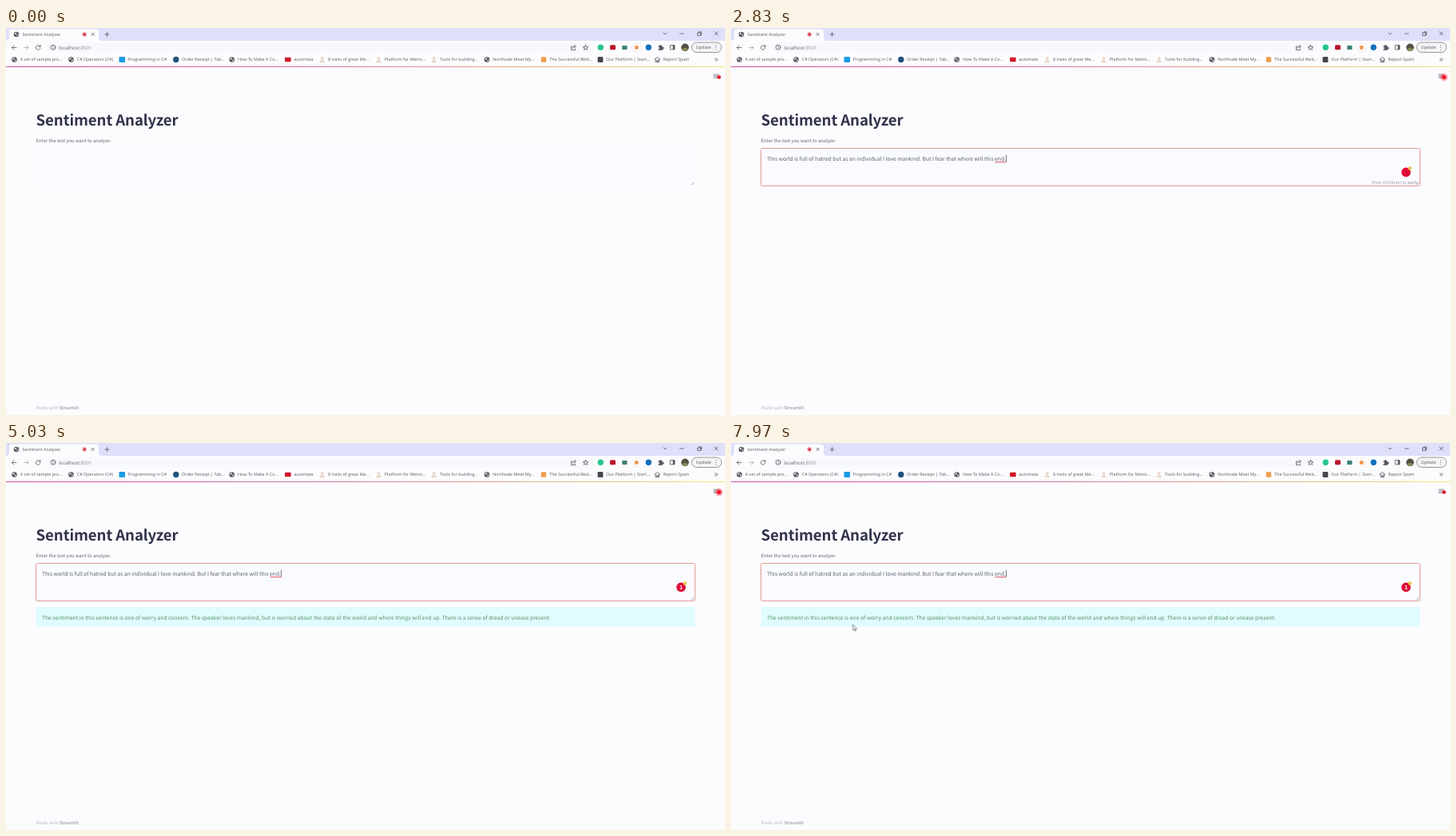
Animation, 900 px wide and 484 px high, one loop 8000 ms. Source, as an HTML page:

```html
<!DOCTYPE html>
<html lang="en">
<head>
<meta charset="utf-8">
<title>Sentiment Analyzer</title>
<style>
html, body { margin: 0; width: 100%; height: 100%; overflow: hidden; background: #fcfcff; }
svg { display: block; width: 100%; height: 100%; }
text { text-rendering: geometricPrecision; white-space: pre; }
.chrome { font: 5.4px "Open Sans", "Noto Sans", sans-serif; fill: #5b5b60; }
.page { font: 6.73px "Noto Sans CJK SC", "Noto Sans CJK JP", "Noto Sans CJK", "Noto Sans", sans-serif; }
.line { fill: none; stroke: #55555c; stroke-width: .8; stroke-linecap: round; stroke-linejoin: round; }

/* Timeline: one 8 s loop, hard cuts unless stated otherwise */
.cut { animation: 8s step-end infinite; }
.focus { animation-name: focus; }
.typed { animation-name: typed; }
.hint { animation-name: hint; }
.caret { animation-name: caret; }
.idle { animation-name: idle; }
.flagged { animation-name: flagged; }
.count { animation-name: count; }
.running { animation-name: running; }
.answer { animation: answer 8s linear infinite; }
.panel { animation: panel 8s linear infinite; }
.glow { animation: glow 1s ease-in-out infinite alternate; }
.mouse { animation: move 8s ease-in-out infinite, mouse 8s step-end infinite; }

@keyframes focus { 0% { opacity: 0 } 10%, 100% { opacity: 1 } }
@keyframes typed { 0% { opacity: 0 } 18.875%, 100% { opacity: 1 } }
@keyframes hint { 0% { opacity: 0 } 18.875% { opacity: 1 } 42.5%, 100% { opacity: 0 } }
@keyframes idle { 0% { opacity: 0 } 12.5% { opacity: 1 } 30%, 100% { opacity: 0 } }
@keyframes flagged { 0% { opacity: 0 } 30%, 100% { opacity: 1 } }
@keyframes count { 0% { opacity: 0 } 37.5%, 100% { opacity: 1 } }
@keyframes running { 0% { opacity: 0 } 45.5% { opacity: 1 } 57%, 100% { opacity: 0 } }
@keyframes caret {
  0%, 25.5%, 38.75%, 52%, 65.25%, 78.5%, 91.75% { opacity: 0 }
  18.875%, 32.125%, 45.375%, 58.625%, 71.875%, 85.125%, 98.375%, 100% { opacity: 1 }
}
@keyframes answer {
  0%, 52.4% { opacity: 0; fill: #8fc3d0 }
  53.75% { opacity: .7; fill: #8fc3d0 }
  57%, 100% { opacity: 1; fill: #5c9068 }
}
@keyframes panel { 0%, 53.8% { opacity: 0 } 57%, 100% { opacity: 1 } }
@keyframes glow { from { opacity: 0 } to { opacity: 1 } }
@keyframes mouse { 0% { opacity: 0 } 76.25%, 100% { opacity: 1 } }
@keyframes move {
  0%, 76.25% { transform: translate(300px, 300px) }
  83.75% { transform: translate(222.5px, 256.5px) }
  94%, 100% { transform: translate(152.5px, 227px) }
}
</style>
</head>
<body>
<svg viewBox="0 0 900 484" preserveAspectRatio="none">
  <defs>
    <linearGradient id="accent">
      <stop offset="0" stop-color="#cf4fa9"/>
      <stop offset=".45" stop-color="#d673a0"/>
      <stop offset=".75" stop-color="#e3b384"/>
      <stop offset="1" stop-color="#ebe67c"/>
    </linearGradient>
    <radialGradient id="halo">
      <stop offset=".35" stop-color="#ff2a3c" stop-opacity=".75"/>
      <stop offset="1" stop-color="#ff2a3c" stop-opacity="0"/>
    </radialGradient>
    <g id="globe">
      <circle r="3.3" fill="#55565a"/>
      <path d="M-2.2-1.2Q-.6-2.8.6-1.8L-.4-.3-2.2.2ZM.4.7 2.5-.4Q2.4 1.6.8 2.4Z" fill="#e4e5ea"/>
    </g>
    <g id="figure" fill="none" stroke="#e6bc9c" stroke-width=".9">
      <circle cy="-1.6" r="1.3"/>
      <path d="M-2.8 2.8Q0-1.2 2.8 2.8Z"/>
    </g>
  </defs>

  <rect width="900" height="484" fill="#fcfcff"/>

  <g class="chrome">
    <rect width="900" height="16" fill="#dedffa"/>
    <path d="M0 16Q4 16 4 12V5Q4 1.5 7.5 1.5H113Q116 1.5 116 5V12Q116 16 120 16Z" fill="#fcfcff"/>
    <use href="#globe" x="13" y="8"/>
    <text x="20.5" y="10" font-size="5.3">Sentiment Analyzer</text>
    <circle cx="98.2" cy="8" r="2.6" fill="none" stroke="#e98a90" stroke-width=".8"/>
    <circle cx="98.2" cy="8" r="1.7" fill="#d9182d"/>
    <path class="line" d="M107 6.3l3.2 3.2m0-3.2l-3.2 3.2M124 8h5m-2.5-2.5v5"/>
    <path class="line" d="M823 6l2 2 2-2M843.5 7h4.5M866 6h3.5v3.5h-3.5ZM867.2 6v-1.2h3.5v3.5h-1.2M887 4.7l4.2 4.2m0-4.2l-4.2 4.2"/>

    <rect x="51" y="18.5" width="685" height="12" rx="6" fill="#f8f8ff"/>
    <path class="line" d="M13 24.5H7.4m2.5-2.6-2.6 2.6 2.6 2.6"/>
    <path class="line" stroke-opacity=".5" d="M22.5 24.5h5.4m-2.5-2.6 2.6 2.6-2.6 2.6"/>
    <path class="line" d="M42.5 22.7A2.8 2.8 0 1 0 43 25M43.1 21.4v2h-2"/>
    <circle class="line" cx="59" cy="24.2" r="3"/>
    <path class="line" d="M59 24v1.6M59 22.5v.1"/>
    <text x="66.3" y="26.5" font-size="6.1">localhost<tspan fill="#8a8a92">:8501</tspan></text>

    <path class="line" d="M709.5 23h-2v4.5h5v-1.5M709 25.5q.5-2.6 3.5-2.6M711.5 21.2l2 1.7-2 1.7"/>
    <path class="line" d="M725.5 21.3l.9 2.1 2.3.2-1.8 1.4.6 2.3-2-1.2-2 1.2.6-2.3-1.8-1.4 2.3-.2Z"/>
    <circle cx="744.3" cy="24.2" r="3.7" fill="#27c58f"/>
    <rect x="756" y="21.2" width="7" height="6" rx="1.5" fill="#b9162d"/>
    <rect x="771.3" y="22" width="6.2" height="5" fill="#3d8174"/>
    <circle cx="789.3" cy="24.3" r="5.8" fill="#fff" stroke="#e6e6ef" stroke-width=".7"/>
    <circle cx="789.3" cy="24.3" r="2.6" fill="#f19a55"/>
    <circle cx="804.3" cy="24.3" r="3.7" fill="#1471bd"/>
    <path d="M816.5 22.5h1.5a1.2 1.2 0 1 1 2.3 0h1.6v1.6a1.2 1.2 0 1 1 0 2.2v1.5h-5.4v-1.6a1.1 1.1 0 1 0 0-2.1Z" fill="#55565c"/>
    <rect class="line" x="831.7" y="21.5" width="5.2" height="5.4"/>
    <rect x="834.7" y="21.5" width="2.4" height="5.4" fill="#55555c"/>
    <circle cx="850" cy="24.3" r="4.8" fill="#555044"/>
    <path d="M846 27q4-4.3 8 0-1.4 2.1-4 2.1T846 27Z" fill="#8a8a57"/>
    <rect x="858.4" y="18" width="37.2" height="12.5" rx="6.2" fill="#f4f4f8" stroke="#8e8d84" stroke-width=".9"/>
    <text x="863.5" y="26.2" font-size="5.6" fill="#5c5d5b">Update</text>
    <path d="M888.5 21.6v.1m0 2.6v.1m0 2.6v.1" stroke="#77776f" stroke-width="1.1" stroke-linecap="round"/>

    <g id="bookmarks"></g>
    <path class="line" d="M887.4 37.8l1.5 1.7-1.5 1.7m2-3.4 1.5 1.7-1.5 1.7"/>
  </g>

  <rect y="48" width="900" height="1" fill="url(#accent)"/>

  <g class="page">
    <path d="M885.5 58.2h7m-7 2h7m-7 2h7" stroke="#85858d" stroke-width="1"/>
    <circle class="glow" cx="892.5" cy="61.5" r="5.8" fill="url(#halo)"/>
    <circle cx="892.6" cy="61.5" r="2.3" fill="#ee1228"/>

    <g class="cut running" fill="#cfd0ea">
      <circle cx="808.8" cy="56" r="1.3"/>
      <path d="M804.5 58.5h8.6M808.8 58v4m0-.5-2 4m2-4 2 4" fill="none" stroke="#c8c9d4" stroke-width="1.2"/>
      <text x="818.5" y="62.4" font-size="5.5">RUNNING...</text>
      <text x="859" y="62.5" font-size="5.85" fill="#a4a5be">Stop</text>
    </g>

    <text x="37.6" y="122.3" font-size="18.64" font-weight="700" letter-spacing="-.1" fill="#30334a">Sentiment Analyzer</text>
    <text x="37.6" y="143" font-size="5.86" fill="#62636a">Enter the text you want to analyze:</text>

    <rect x="37.5" y="150.5" width="825" height="47" rx="2" fill="#fafbff"/>
    <rect class="cut focus" x="37.5" y="150.5" width="825" height="47" rx="2" fill="none" stroke="#e09a92"/>
    <path d="M858 196l3-3m-1.2 3 1.2-1.2" stroke="#8f96a8" stroke-width=".7"/>
    <text class="cut typed" x="45" y="165.6" fill="#5c6072">This world is full of hatred but as an individual I love mankind. But I fear that where will this end.</text>
    <path class="cut caret" d="M344.6 158.8v8.6" stroke="#404350" stroke-width=".8"/>
    <text class="cut hint" x="859.5" y="195.2" font-size="5" text-anchor="end" fill="#9092a2">Press Ctrl+Enter to apply</text>

    <circle class="cut idle" cx="845.3" cy="180.3" r="5.8" fill="#1dcb9a"/>
    <g class="cut flagged">
      <path d="M330.5 167.7h14" stroke="#db5060" stroke-width="1"/>
      <circle cx="845" cy="180.4" r="5.8" fill="#df0c37"/>
      <circle cx="849.8" cy="175.6" r="2.3" fill="#e9c553"/>
    </g>
    <text class="cut count" x="845" y="183" font-size="7" font-weight="700" text-anchor="middle" fill="#fff">1</text>

    <rect class="panel" x="37.5" y="205" width="825" height="25" rx="2" fill="#e0fcff"/>
    <text class="answer" x="45" y="220.7">The sentiment in this sentence is one of worry and concern. The speaker loves mankind, but is worried about the state of the world and where things will end up. There is a sense of dread or unease present.</text>

    <text x="37.6" y="476.5" font-size="5.73" fill="#b7b8c8">Made with <tspan fill="#83848f">Streamlit</tspan></text>
  </g>

  <path class="mouse" d="M0 0V7.2L1.7 5.7 2.8 8.2 3.9 7.7 2.8 5.3H5Z" fill="#fff" stroke="#55565c" stroke-width=".7"/>
</svg>
<script>
const use = id => x => `<use href="#${id}" x="${x}" y="39.5"/>`;
const disc = color => x => `<circle cx="${x}" cy="39.5" r="3.7" fill="${color}"/>`;
const box = (color, w, h) => x =>
  `<rect x="${x - w / 2}" y="${39.5 - h / 2}" width="${w}" height="${h}" rx="1" fill="${color}"/>`;
const house = x => `<path class="line" d="M${x - 3.3} 39.4l3.3-3 3.3 3m-5.6-1v4.1h4.6v-4.1m-2.8 4v-2.3h1.4v2.3"/>`;
const globe = use('globe'), figure = use('figure');

const bookmarks = [
  [10.5, globe, 'A set of sample pro...'],
  [81.5, globe, 'C# Operators (C#)'],
  [145.3, box('#1b9ce4', 7.6, 7.2), 'Programming in C#'],
  [212.8, disc('#22527c'), 'Order Receipt | Tab...'],
  [282.7, globe, 'How To Make A Co...'],
  [352.9, box('#d3182b', 7.6, 5.6), 'automata'],
  [395.8, figure, '8 traits of great Me...'],
  [466.5, figure, 'Platform for Metro...'],
  [535.8, figure, 'Tools for building...'],
  [602, globe, 'Northvale Meet My...'],
  [673, box('#ee9c4e', 6.4, 6.4), 'The Successful Web...'],
  [744, box('#45464e', 6.8, 6.8), 'Our Platform | Start...'],
  [815.3, house, 'Report Spam']
];
document.getElementById('bookmarks').innerHTML = bookmarks
  .map(([x, icon, label]) => `${icon(x)}<text x="${x + 7.3}" y="41.3">${label}</text>`)
  .join('');
</script>
</body>
</html>
```
